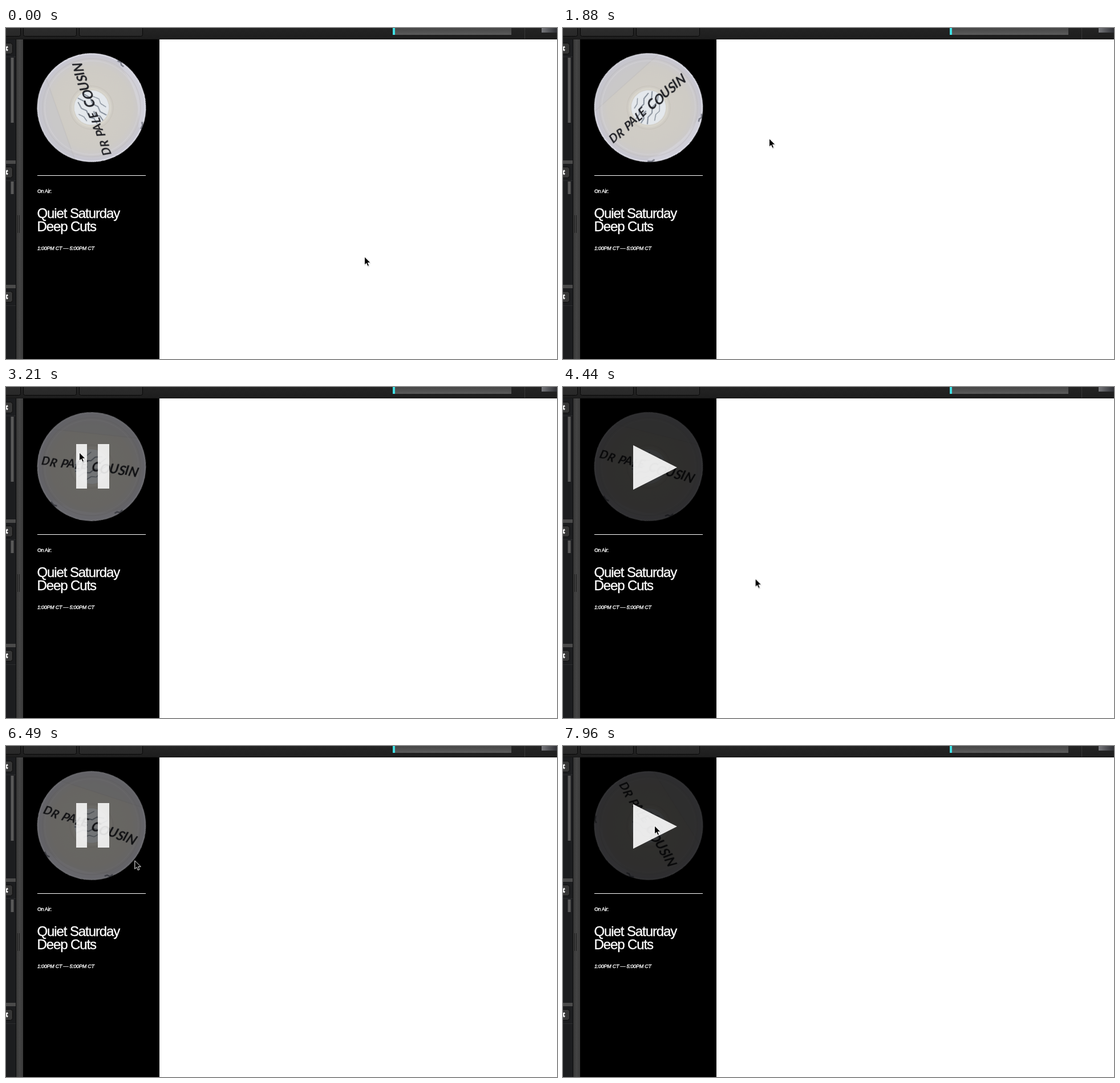
An HTML page that plays this animation: 966x580 px, repeating every 7.99 s.

```html
<!DOCTYPE html>
<html lang="en">
<head>
<meta charset="utf-8">
<title>Radio player</title>
<style>
html, body { margin: 0; width: 100%; height: 100%; overflow: hidden; background: #fff; }
svg { display: block; width: 966px; height: 580px; }
.label { font-family: "Liberation Sans", Arial, sans-serif; fill: #fff; stroke: #fff; stroke-width: .35; }
.marker { font-family: Lato, "Open Sans", sans-serif; font-style: italic; font-weight: 700; fill: #1c1d22; }

.spin, .dim, .pause, .play, .cursor { animation: 7990ms step-end infinite; }
.spin { animation-name: spin; animation-timing-function: linear; }
.dim { animation-name: dim; }
.pause { animation-name: pause; }
.play { animation-name: play; }
.cursor { animation-name: move; animation-timing-function: linear; }

@keyframes spin {
  0% { transform: rotate(-109.5deg); }
  4.88%, 6.75% { transform: rotate(-95.46deg); }
  6.76% { transform: rotate(-90.06deg); }
  42.93%, 79.85% { transform: rotate(14deg); }
  94.99%, 100% { transform: rotate(57.56deg); }
}
@keyframes dim {
  0%, 82.1% { opacity: 1; }
  34.5%, 79.85%, 92.2% { opacity: .5; }
  42.93%, 94.99%, 100% { opacity: .23; }
}
@keyframes pause {
  0%, 42.93%, 82.1%, 94.99%, 100% { opacity: 0; }
  34.5%, 79.85%, 92.2% { opacity: .86; }
}
@keyframes play {
  0%, 79.85% { opacity: 0; }
  42.93%, 94.99%, 100% { opacity: .9; }
}
@keyframes move {
  0%, 6.76% { transform: translate(628px, 400px); }
  8.76% { transform: translate(500px, 350px); }
  11.01% { transform: translate(372px, 288px); }
  13.52% { transform: translate(362px, 222px); }
  16.27%, 27.16% { transform: translate(361px, 193px); }
  30.04% { transform: translate(374px, 186px); }
  32.79% { transform: translate(330px, 168px); }
  35.04% { transform: translate(220px, 138px); }
  36.8% { transform: translate(140px, 118px); }
  37.55%, 47.81% { transform: translate(128px, 114px); }
  49.81% { transform: translate(250px, 240px); }
  51.81%, 55.57% { transform: translate(337px, 336px); }
  57.57% { transform: translate(270px, 190px); }
  59.32% { transform: translate(195px, 79px); }
  61.33% { transform: translate(128px, 140px); }
  63.33% { transform: translate(165px, 300px); }
  65.33% { transform: translate(240px, 401px); }
  67.58% { transform: translate(185px, 280px); }
  69.96% { transform: translate(130px, 177px); }
  71.59% { transform: translate(150px, 130px); }
  73.34% { transform: translate(250px, 160px); }
  74.47% { transform: translate(322px, 230px); }
  75.47% { transform: translate(304px, 280px); }
  77.22%, 80.1% { transform: translate(213px, 196px); }
  82.6% { transform: translate(240px, 205px); }
  85.11% { transform: translate(305px, 250px); }
  87.61%, 89.74% { transform: translate(338px, 277px); }
  91.36% { transform: translate(270px, 225px); }
  92.87% { transform: translate(200px, 165px); }
  94.62%, 100% { transform: translate(160px, 139px); }
}
</style>
</head>
<body>
<svg viewBox="0 0 966 580">
  <defs>
    <linearGradient id="bar" x2="0" y2="1"><stop stop-color="#242424"/><stop offset="1" stop-color="#1d1d1d"/></linearGradient>
    <linearGradient id="tab" x2="0" y2="1"><stop stop-color="#303030"/><stop offset="1" stop-color="#282828"/></linearGradient>
    <linearGradient id="meter" x2="0" y2="1"><stop stop-color="#464646"/><stop offset="1" stop-color="#5a5a5a"/></linearGradient>
    <linearGradient id="gutter"><stop stop-color="#333"/><stop offset=".5" stop-color="#444"/><stop offset="1" stop-color="#3a3a3a"/></linearGradient>
    <linearGradient id="thumb"><stop stop-color="#77787c"/><stop offset=".45" stop-color="#55565a"/><stop offset="1" stop-color="#303136"/></linearGradient>
    <radialGradient id="vinyl" gradientUnits="userSpaceOnUse" cx="0" cy="0" r="95.5">
      <stop stop-color="#d2cec6"/><stop offset=".74" stop-color="#cecbc5"/>
      <stop offset=".88" stop-color="#cbc9cb"/><stop offset=".96" stop-color="#c6c5d0"/><stop offset="1" stop-color="#e6e6ee"/>
    </radialGradient>
    <clipPath id="edge"><circle r="95.5"/></clipPath>
    <clipPath id="hole"><circle r="30.5"/></clipPath>
    <g id="close">
      <rect x="-8" y=".5" width="19.5" height="19" rx="4" fill="#363636" stroke="#0c0c0c"/>
      <path d="M-5 6.5 L3 13.5 M-5 13.5 L3 6.5" stroke="#eee" stroke-width="3"/>
    </g>
  </defs>

  <rect width="966" height="580" fill="#fff"/>

  <!-- top bar -->
  <rect width="966" height="20" fill="url(#bar)"/>
  <rect y="19" width="966" height="1" fill="#181818"/>
  <g fill="url(#tab)" stroke="#080808">
    <rect x="-10" y="-10" width="35.5" height="24.5" rx="3"/>
    <rect x="30.5" y="-10" width="93" height="24.5" rx="3"/>
    <rect x="128.5" y="-10" width="111" height="24.5" rx="3"/>
  </g>
  <rect x="678" width="208" height="12" fill="url(#meter)"/>
  <rect x="678" width="4" height="12" fill="#3fe0e4"/>
  <rect x="909" width="1" height="19" fill="#383838"/>
  <rect x="939" width="27" height="8" fill="url(#thumb)"/>

  <!-- left strip -->
  <rect y="20" width="18" height="560" fill="#1c1d1f"/>
  <g fill="#2b2c2e">
    <rect y="50" width="17" height="1"/><rect y="267" width="17" height="1"/><rect y="486" width="17" height="1"/>
  </g>
  <g fill="#4a4a4a">
    <rect y="232" width="17" height="6"/><rect y="450" width="17" height="6"/>
  </g>
  <g fill="#595959">
    <rect x="8.5" y="52" width="5" height="114"/><rect x="8.5" y="269" width="5" height="22"/>
  </g>
  <use href="#close" y="26"/><use href="#close" y="243"/><use href="#close" y="461"/>
  <rect x="17" y="20" width="13" height="560" fill="url(#gutter)"/>
  <rect x="17" y="20" width="1" height="560" fill="#0c0c0c"/>
  <path d="M20.5 328V359M23.5 328V359" stroke="#1d1d1d"/>

  <!-- player column -->
  <rect x="30" y="20" width="239" height="560" fill="#000"/>
  <rect x="55" y="258" width="190" height="1" fill="#fff"/>
  <g class="label">
    <text x="55" y="289" font-size="9" letter-spacing="-.4">On Air:</text>
    <g font-size="24" letter-spacing="-1.1">
      <text x="54.5" y="333">Quiet Saturday</text>
      <text x="54.5" y="356">Deep Cuts</text>
    </g>
    <text x="55" y="388.5" font-size="9" font-style="italic" letter-spacing="-.25">1:00PM CT — 5:00PM CT</text>
  </g>

  <!-- record -->
  <g transform="translate(150 139.5)">
    <g class="dim"><g class="spin" clip-path="url(#edge)">
      <circle r="95.5" fill="url(#vinyl)"/>
      <path d="M-96 -58 H96 V-96 H-96Z" fill="#c4c3ca" opacity=".45"/>
      <path d="M-80 -58 H80" stroke="#bbb9b8" stroke-width=".8"/>
      <path d="M-60 66 Q0 92 56 70 L62 80 Q0 108 -68 78Z" fill="#dddce6" opacity=".4"/>
      <g fill="none" stroke="#b9b7bc">
        <circle r="86" opacity=".7"/><circle r="82" stroke="#d6d4d8"/>
        <circle r="38" stroke="#c5c1b8"/><circle r="33" stroke="#d8d5cc" stroke-width="3"/>
      </g>
      <g fill="none" stroke="#777985" stroke-width="2.5">
        <path d="M49 77 l4 -3 5 1 4 -5"/><path d="M-64 69 l5 5 6 1"/>
      </g>
      <g clip-path="url(#hole)">
        <circle r="30.5" fill="#e4e8ec"/>
        <g transform="rotate(-28)" fill="none" stroke="#7b8490" stroke-width="1.8">
          <path d="M-26 -14 l10 3 7 -4 12 5 9 -3 12 4"/>
          <path d="M-30 -3 l9 2 8 -4 6 3 M6 -3 l9 3 14 -4"/>
          <path d="M-28 8 l12 -3 9 4 10 -3 11 5 14 -3"/>
          <path d="M-18 18 l11 -2 8 4 14 -5 M-10 -23 l9 2 10 -3" stroke-width="1.2"/>
        </g>
      </g>
      <g class="marker" transform="skewX(-6)">
        <text x="-88" y="6" font-size="20.5" dy="0 1" rotate="-3 4">DR</text>
        <text x="-54" y="7" font-size="21" dy="0 -1 1 -1" rotate="3 -4 2 -3">PALE</text>
        <text x="1" y="8" font-size="23.5" letter-spacing="-.5" dy="0 1 -1 1 -1 1" rotate="-3 4 -2 3 -2 4">COUSIN</text>
      </g>
    </g></g>
  </g>
  <path class="pause" d="M123 100h19v78h-19z M161 100h20v78h-20z" fill="#fff"/>
  <path class="play" d="M123 102 L200 141 L123 180Z" fill="#fff"/>

  <g class="cursor">
    <path d="M.5 1.5 V16.5 L4 13.5 L6.5 19 L9.5 17.8 L7 12.5 H12Z" fill="#000" opacity=".18"/>
    <path d="M.5 .8 V15.3 L3.8 12.2 L6 17.4 L8.6 16.3 L6.4 11.3 H11Z" fill="#000" stroke="#fff"/>
  </g>
</svg>
</body>
</html>
```
